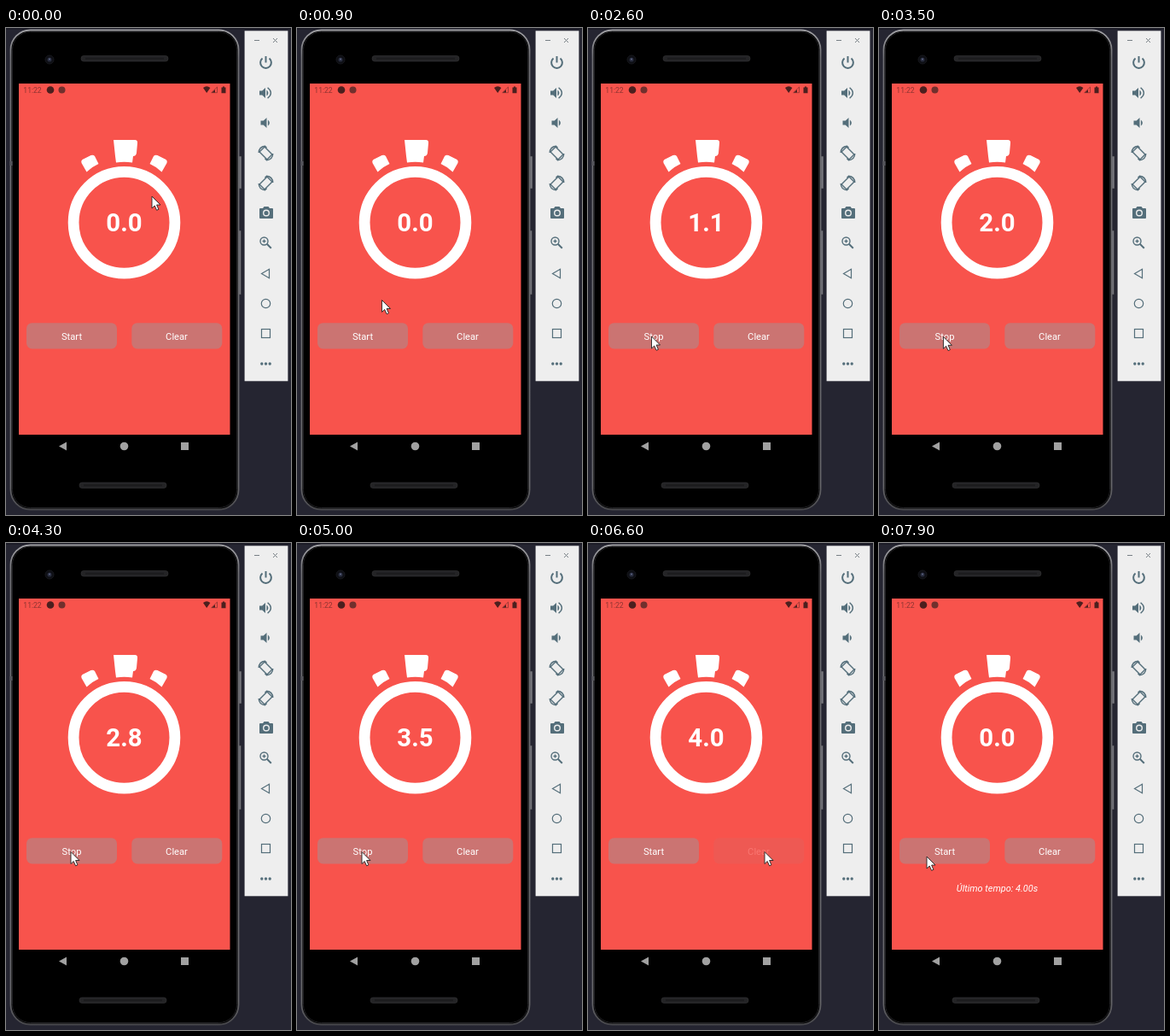
An HTML page for the animation above (8 s loop, 334 by 570 pixels).

```html
<!DOCTYPE html>
<html lang="en">
<head>
<meta charset="utf-8">
<title>Stopwatch app</title>
<style>
  html, body { margin: 0; width: 100%; height: 100%; overflow: hidden; background: #252531; }
  svg { display: block; width: 334px; height: 570px; }
  text { font-family: Roboto, Arial, sans-serif; fill: #fff; text-anchor: middle; }
  .label { font-size: 11.2px; }
  .line { fill: none; stroke: #546e7a; stroke-width: 1.4; }
  .thin { stroke-width: 1.2; }
  .bold { stroke-width: 2; }
  .solid { fill: #546e7a; }
</style>
</head>
<body>
<svg viewBox="0 0 334 570">
  <defs>
    <linearGradient id="edge" x2="0" y2="1">
      <stop offset="0" stop-color="#a0a0a4"/>
      <stop offset=".06" stop-color="#707075"/>
      <stop offset=".95" stop-color="#68686c"/>
      <stop offset="1" stop-color="#48484c"/>
    </linearGradient>
    <g id="speaker">
      <path class="solid" d="M-6-2.5h3.2L1-6V6L-2.8 2.5H-6zM2.4-3.6Q6.4 0 2.4 3.6z"/>
    </g>
    <g id="rotate">
      <rect class="line" x="-4.2" y="-6.3" width="8.4" height="12.6" rx="1" transform="rotate(-45)"/>
      <path class="line" d="M-8.3-.5Q-8-7.5-1-8.3l2 2M8.3 .5Q8 7.5 1 8.3l-2-2"/>
    </g>
    <g id="grille">
      <rect width="102" height="6.5" rx="3" fill="#242426" stroke="#343437" stroke-width=".6"/>
      <path d="M5 3.3h92" stroke="#1b1b1d" stroke-width="2"/>
    </g>
  </defs>

  <!-- phone -->
  <rect width="334" height="570" fill="#252531"/>
  <rect width="334" height="2" fill="#1d1d28"/>
  <path d="M273 150h3v38h-3zM273 237h2.5v75h-2.5z" fill="#77777d" stroke="#2a2a30" stroke-width=".5"/>
  <rect x="5.5" y="2.5" width="267" height="561" rx="23" fill="#000" stroke="url(#edge)" stroke-width="1.8"/>
  <rect x="7.5" y="4.5" width="263" height="557" rx="21" fill="#000" stroke="#222225"/>
  <path d="M4.5 156h3v5h-3z" fill="#55555b"/>
  <circle cx="51" cy="37" r="5" fill="#0d0e13" stroke="#17181d"/>
  <circle cx="51" cy="37" r="2.6" fill="#272b3c"/>
  <circle cx="51" cy="36.5" r="1.1" fill="#5a627f"/>
  <use href="#grille" x="88" y="32.5"/>
  <use href="#grille" x="86" y="532"/>
  <g fill="#a1a1a1">
    <path d="M62 489.5l9-5v10z"/>
    <circle cx="138.5" cy="489.5" r="4.8"/>
    <rect x="205" y="485" width="9" height="9"/>
  </g>

  <!-- app screen -->
  <rect x="15" y="65" width="247.5" height="411" fill="#f8534c"/>
  <text x="31" y="75.8" style="font-size:8.6px;fill:#8f3532">11:22</text>
  <g fill="#4c1f1e">
    <circle cx="52" cy="72.5" r="4.3"/>
    <circle cx="65.5" cy="72.5" r="4" fill="#71302d"/>
    <path d="M231 70q4.2-3.4 8.4 0l-4.2 6zM245 72v4h-4.5zM252.5 69.5h1.5v-1h2v1h1.5v6.8h-5z"/>
    <path d="M247.5 69v6.7h-6.7z" fill="none" stroke="#8f3532" stroke-width=".8"/>
  </g>
  <g fill="#fff">
    <circle cx="138.5" cy="227.8" r="59.4" fill="none" stroke="#fff" stroke-width="12.8"/>
    <path d="M126 131h25q3.5 0 3 4l-1 11q-.5 4-4 4l-1 7.5q-9.5-1.5-19 0l-1-7.5q-3.500-4-4l-1-11q-.5-4 3-4z"/>
    <path id="lug" d="M88.500 158q-1-2.500 1-4l10-5q3-1 4.500 1l4.500 9q-8 3.500-14 9.500z"/>
    <use href="#lug" transform="matrix(-1 0 0 1 277 0)"/>
  </g>
  <text id="time" x="138.5" y="238.3" font-size="29.4" font-weight="700">0.0</text>
  <g id="toggle">
    <rect x="24" y="345.200" width="106" height="30.300" rx="6.500" fill="#cb7472"/>
    <text id="action" class="label" x="77" y="364.5">Start</text>
  </g>
  <g id="clear">
    <rect x="147.300" y="345.200" width="106" height="30.300" rx="6.500" fill="#cb7472"/>
    <text class="label" x="200" y="364.5">Clear</text>
  </g>
  <text id="last" x="138.5" y="408" font-size="10.95" font-style="italic">Último tempo: 4.00s</text>

  <!-- emulator toolbar -->
  <rect x="279.6" y="3.300" width="50.800" height="410" fill="#eee"/>
  <path d="M291 14.5h6M313 12l5 5m0-5l-5 5" stroke="#777f85" fill="none"/>
  <path class="line bold" transform="translate(304.5 40.5)" d="M-4-5A6.4 6.4 0 1 0 4-5M0-7.5V0"/>
  <g transform="translate(304 76)">
    <use href="#speaker" x="-1"/>
    <path class="line" d="M2.600-6.200Q10.200 0 2.600 6.200"/>
  </g>
  <use href="#speaker" x="304.500" y="111"/>
  <use href="#rotate" x="304.5" y="146.5"/>
  <use href="#rotate" transform="translate(304.5 181.5) scale(-1 1)"/>
  <path class="solid" d="M298 211h3l1.5-2h5l1.5 2h3q1 0 1 1v10q0 1-1 1h-14q-1 0-1-1v-10q0-1 1-1z"/>
  <circle cx="305" cy="216.5" r="3.3" fill="#546e7a" stroke="#eee" stroke-width="1.4"/>
  <g class="line">
    <circle cx="302.5" cy="249.5" r="4.500"/>
    <path d="M300.500 249.5h4M302.5 247.500v4"/>
    <path class="bold" d="M305.800 252.800l5 5"/>
    <path class="thin" d="M299.5 287.5l9-5.3v10.6z"/>
    <circle class="thin" cx="304.5" cy="322.5" r="5.2"/>
    <rect class="thin" x="299.5" y="352.5" width="10" height="10"/>
  </g>
  <g class="solid">
    <circle cx="299.8" cy="393" r="1.7"/><circle cx="304.5" cy="393" r="1.7"/><circle cx="309.2" cy="393" r="1.7"/>
  </g>

  <path id="cursor" d="M0 0V14l3.2-3 2.4 5.3 2.3-1L5.6 10H10z" fill="#fff" stroke="#222" stroke-width=".9"/>
</svg>
<script>
const $ = id => document.getElementById(id);
const LOOP = 8000, STEP = 100, BEGIN = 1500, END = 5500, RESET = 6700;

// pointer stops: time, x, y
const path = [
  [300, 171, 197], [1200, 74.5, 361], [2800, 74.5, 361], [4000, 76, 361.5],
  [5400, 76, 361.5], [5600, 187, 373.5], [5800, 187, 373.5], [6200, 207, 361.5],
  [6800, 207, 361.5], [7500, 56, 367], [LOOP, 56, 367]
];

const clamp = v => Math.max(0, Math.min(1, v));
const ease = v => v * v * (3 - 2 * v);

function pointer(t) {
  const i = path.findIndex(p => p[0] > t);
  if (i < 1) return path[0].slice(1);
  const [a, b] = [path[i - 1], path[i]];
  const k = ease((t - a[0]) / (b[0] - a[0]));
  return [1, 2].map(n => a[n] + (b[n] - a[n]) * k);
}

// a touched button fades to 20% and returns after release
function touch(t, down, up) {
  const pressed = ease(clamp((t - down) / 150));
  const back = ease(clamp((t - up) / 250));
  return 1 - .8 * pressed * (1 - back);
}

function draw(now) {
  const t = Math.floor(now % LOOP / STEP) * STEP;
  const count = t < RESET ? Math.max(0, Math.min(t, END) - BEGIN) / 1000 : 0;
  $('time').textContent = count.toFixed(1);
  $('action').textContent = t >= BEGIN - STEP && t < END ? 'Stop' : 'Start';
  $('toggle').style.opacity = Math.min(touch(t, 1200, 1400), touch(t, 5250, 5480));
  $('clear').style.opacity = touch(t, 6350, 6600);
  $('last').style.visibility = t < RESET ? 'hidden' : 'visible';
  $('cursor').setAttribute('transform', `translate(${pointer(t)})`);
}

const start = performance.now();
function frame() {
  draw(performance.now() - start);
  requestAnimationFrame(frame);
}
frame();
</script>
</body>
</html>
```
